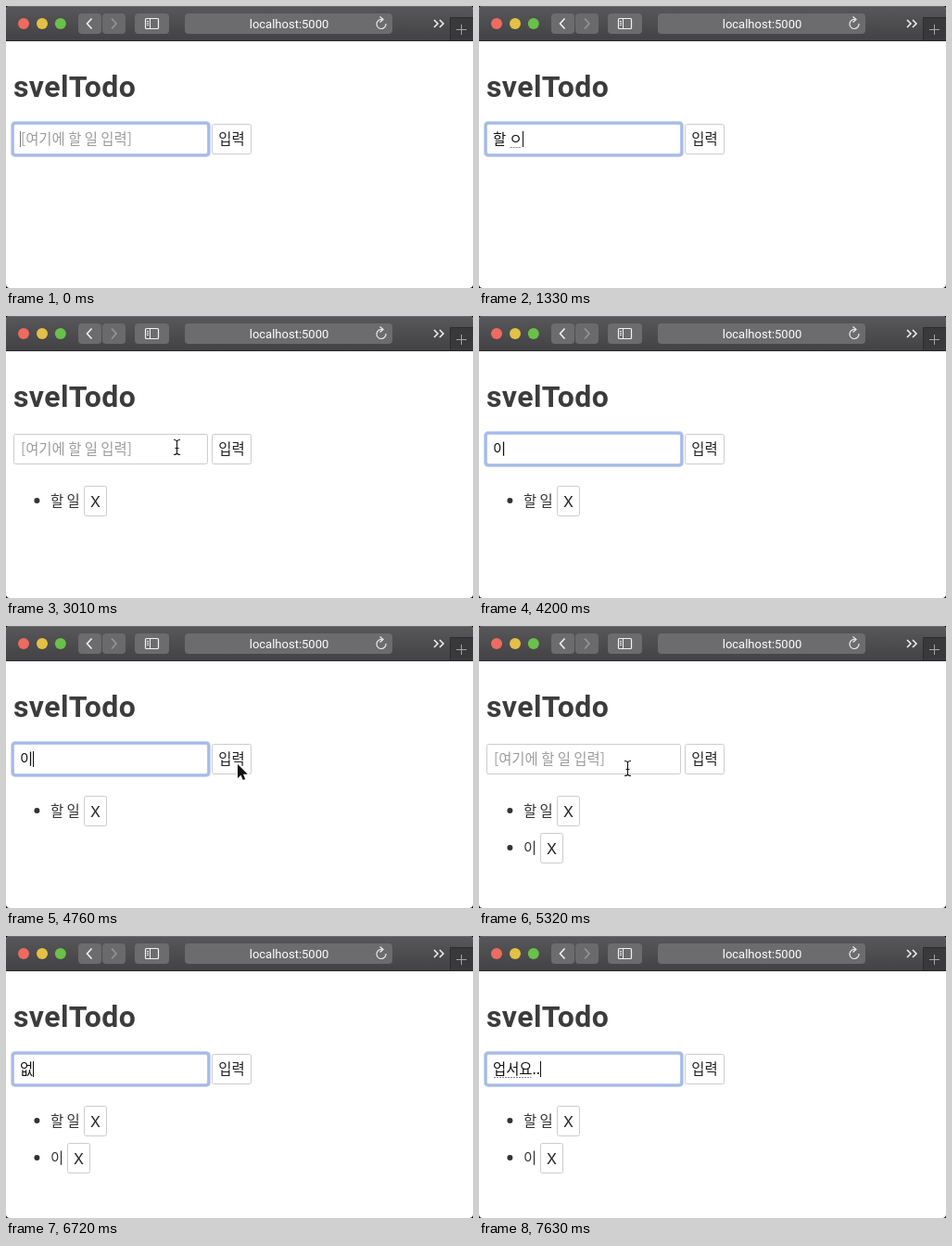
Recreate the animation shown at these times as an HTML page with a canvas. Size 504 px wide and 304 px high, loop 8 s.

```html
<!DOCTYPE html>
<html lang="ko">
<head>
<meta charset="utf-8">
<title>svelTodo</title>
<style>
html, body { margin: 0; width: 504px; height: 304px; overflow: hidden; background: #fff; }
canvas { display: block; width: 504px; height: 304px; }
</style>
</head>
<body>
<canvas id="stage" width="504" height="304"></canvas>
<script>
const ctx = document.getElementById('stage').getContext('2d');
const LOOP = 8000, TICK = 70;
const KOREAN = '15.4px "Noto Sans CJK KR", "Noto Sans CJK", sans-serif';
const LATIN = 'Roboto, Inter, sans-serif';

// [time, typed text, start of the composing underline]; null shows the placeholder
const typing = [
  [0, null], [420, 'ㅎ'], [560, '하'], [700, '할'], [840, '할 '],
  [1330, '할 ㅇ', 2], [1470, '할 이', 2], [1540, '할 일', 2],
  [2660, null], [3500, 'ㅇ'], [3640, '이'],
  [5040, null], [5950, 'ㅇ'], [6090, '어'], [6300, '업'], [6720, '없'],
  [6860, '업서'], [7000, '업성'], [7210, '업서요'],
  [7560, '업서요.', 0], [7630, '업서요..', 0]
];
const blurred = [[2660, 3220], [5040, 5600]];
const caretOff = [[2030, 2520], [4200, 4760]];
const pointerShown = [[2240, 3500], [4340, 5950]];
const pointerPath = [
  [2170, 176, 147], [2590, 250, 146], [2660, 250, 146], [3010, 184, 141.5],
  [4340, 184, 141.5], [4620, 266, 152], [4760, 250, 149], [5110, 250, 149], [5320, 160, 153]
];
const items = [
  { from: 2660, text: '할 일', y: 199, buttonX: 84 },
  { from: 5040, text: '이', y: 239, buttonX: 66 }
];

const within = (t, spans) => spans.some(([a, b]) => t >= a && t < b);
const ease = p => p * p * (3 - 2 * p);

function text(str, x, y, color, font = KOREAN, align = 'left') {
  ctx.font = font;
  ctx.textAlign = align;
  ctx.fillStyle = color;
  ctx.fillText(str, x, y);
}

function box(x, y, w, h, r, fill, stroke, width = 1) {
  ctx.beginPath();
  ctx.roundRect(x, y, w, h, r);
  if (fill) { ctx.fillStyle = fill; ctx.fill(); }
  if (stroke) { ctx.strokeStyle = stroke; ctx.lineWidth = width; ctx.stroke(); }
}

const outlined = (x, y, w) => box(x + 0.5, y + 0.5, w - 1, 32, 2, '#fff', '#ccc');

function line(points, color, width = 1) {
  ctx.beginPath();
  for (let i = 0; i < points.length; i += 2) ctx.lineTo(points[i], points[i + 1]);
  ctx.strokeStyle = color;
  ctx.lineWidth = width;
  ctx.stroke();
}

function dot(x, y, r, color) {
  ctx.beginPath();
  ctx.arc(x, y, r, 0, Math.PI * 2);
  ctx.fillStyle = color;
  ctx.fill();
}

function drawToolbar() {
  const shade = ctx.createLinearGradient(0, 0, 0, 38);
  shade.addColorStop(0, '#585759');
  shade.addColorStop(1, '#424143');
  box(0, 0, 504, 38, 0, shade);
  line([4, 0.5, 500, 0.5], '#6c6c6e');

  dot(19, 19, 6, '#ed6b60');
  dot(39, 19, 6, '#e3c146');
  dot(58.8, 19, 6, '#6bc04b');

  box(78, 8, 25, 22, 4, '#6c6b6d');
  box(104, 8, 25, 22, 4, '#6a696b');
  line([92.5, 13.5, 87.5, 19, 92.5, 24.5], '#f2f2f2', 1.6);
  line([114, 13.5, 119, 19, 114, 24.5], '#969597', 1.6);

  box(139, 8, 37, 22, 4, '#6c6b6d');
  box(150.5, 13.5, 14, 11, 1, null, '#f2f2f2', 1.2);
  line([155.5, 13.5, 155.5, 24.5], '#f2f2f2');
  for (const y of [16.5, 18.5, 20.5]) line([152, y, 154, y], '#f2f2f2');

  box(193, 8, 224, 22, 4, '#6c6b6d');
  text('localhost:5000', 305.5, 24, '#fff', '13px ' + LATIN, 'center');
  ctx.beginPath();
  ctx.arc(405, 19.5, 5, -0.1, Math.PI * 1.55);
  ctx.strokeStyle = '#eee';
  ctx.lineWidth = 1.2;
  ctx.stroke();
  line([403.5, 11.5, 407, 14.5, 403.5, 17.5], '#eee', 1.2);

  for (const x of [462, 468]) line([x, 15, x + 4, 19, x, 23], '#f2f2f2', 1.5);

  box(479, 13, 25, 25, 0, '#39393b');
  line([479.5, 38, 479.5, 12.5, 504, 12.5], '#2b2b2d');
  line([486, 25.5, 497, 25.5], '#a5a5a7');
  line([491.5, 20, 491.5, 31], '#a5a5a7');
  line([0, 37.5, 504, 37.5], '#29292b');
}

function drawInput(t) {
  const focused = !within(t, blurred);
  const [, typed, underline] = typing.filter(step => step[0] <= t).pop();
  outlined(8, 127, 210);
  if (focused) {
    box(7, 126, 212, 35, 3, null, '#c9d6f1', 4);
    box(7.25, 126.25, 211.5, 34.5, 2.5, null, '#a6bbe6', 2.6);
  }
  if (typed === null) text('[여기에 할 일 입력]', 16, 149, '#9c9c9c');
  else text(typed, 15, 149, '#111');

  ctx.font = KOREAN;
  const widthOf = str => ctx.measureText(str).width;
  if (underline !== undefined) {
    const start = 16 + widthOf(typed.slice(0, underline));
    const end = 14 + widthOf(typed.replace(/\./g, ''));
    ctx.setLineDash([2, 1]);
    line([start, 152.5, end, 152.5], '#888');
    ctx.setLineDash([]);
  }
  if (focused && !within(t, caretOff)) {
    const x = Math.floor(15.3 + widthOf(typed || '')) + 0.5;
    line([x, 135, x, 152], typed === null ? '#777' : '#111');
  }
}

function drawItems(t) {
  for (const { from, text: label, y, buttonX } of items) {
    if (t < from) continue;
    dot(33.4, y, 3, '#333');
    text(label, 48, y + 5.5, '#333');
    outlined(buttonX, y - 16, 25);
    text('X', buttonX + 12.5, y + 7, '#222', '16px Inter, sans-serif', 'center');
  }
}

function pointerAt(t) {
  const next = pointerPath.findIndex(p => p[0] > t);
  if (next < 0) return pointerPath[pointerPath.length - 1].slice(1);
  const [t0, x0, y0] = pointerPath[next - 1], [t1, x1, y1] = pointerPath[next];
  const p = ease((t - t0) / (t1 - t0));
  return [x0 + (x1 - x0) * p, y0 + (y1 - y0) * p];
}

function drawPointer(t) {
  if (!within(t, pointerShown)) return;
  const [x, y] = pointerAt(t);
  ctx.save();
  if (x < 218) {
    ctx.translate(Math.floor(x) + 0.5, Math.floor(y) + 0.5);
    const beam = new Path2D('M-3.5-8Q-.5-8 0-6.5Q.5-8 3.5-8M0-6.5V6.5M-3.5 8Q-.5 8 0 6.5Q.5 8 3.5 8M-2 1H2');
    ctx.strokeStyle = '#fff';
    ctx.lineWidth = 2.6;
    ctx.stroke(beam);
    ctx.strokeStyle = '#111';
    ctx.lineWidth = 1.1;
    ctx.stroke(beam);
  } else {
    ctx.translate(Math.round(x), Math.round(y));
    const arrow = new Path2D('M0 0V15L3.5 11.8L5.8 17L8.2 16L6 10.8H10.8Z');
    ctx.strokeStyle = '#fff';
    ctx.lineWidth = 2;
    ctx.stroke(arrow);
    ctx.fillStyle = '#111';
    ctx.fill(arrow);
  }
  ctx.restore();
}

function drawTitle() {
  ctx.letterSpacing = '0.4px';
  text('svelTodo', 8, 98, '#3c3c3c', 'bold 32px ' + LATIN);
  ctx.letterSpacing = '0px';
}

function draw(now) {
  const t = Math.floor((now % LOOP) / TICK) * TICK;
  ctx.fillStyle = '#000';
  ctx.fillRect(0, 0, 504, 304);
  ctx.save();
  ctx.beginPath();
  ctx.roundRect(0, 0, 504, 304, 4);
  ctx.clip();
  ctx.fillStyle = '#fff';
  ctx.fillRect(0, 0, 504, 304);
  drawToolbar();
  drawTitle();
  drawInput(t);
  outlined(222, 127, 43);
  text('입력', 243.5, 149, '#222', KOREAN, 'center');
  drawItems(t);
  drawPointer(t);
  ctx.restore();
}

const begin = performance.now();
function loop() {
  draw(performance.now() - begin);
  requestAnimationFrame(loop);
}
loop();
</script>
</body>
</html>
```
